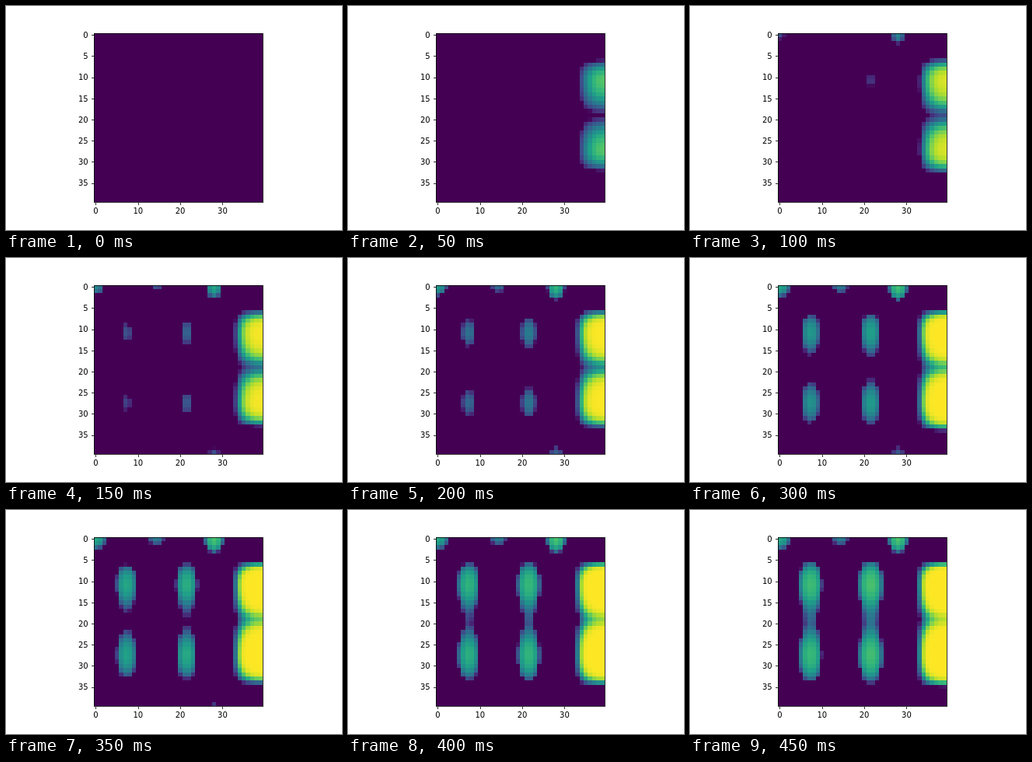
An HTML page with a canvas for the animation above (0.5 s loop, 432 px wide and 288 px high).

```html
<!DOCTYPE html>
<html lang="en">
<head>
<meta charset="utf-8">
<title>Growing spots heatmap</title>
<style>
  html, body { margin: 0; width: 100%; height: 100%; overflow: hidden; background: #fff; }
  canvas { display: block; }
</style>
</head>
<body>
<canvas id="stage" width="432" height="288"></canvas>
<script>
const ctx = document.getElementById("stage").getContext("2d");
const SIZE = 40, LEFT = 112.68, TOP = 34.56, CELL = 5.436;
const STEP = 50, LOOP = 500;
const PALETTE = [
  [68, 1, 84], [72, 40, 120], [62, 74, 137], [49, 104, 142], [38, 130, 142],
  [31, 158, 137], [53, 183, 121], [110, 206, 88], [181, 222, 43], [253, 231, 37]
];
const UPPER = 10.8, LOWER = 27.3, MIDDLE = 19.05;

const edgeX = i => Math.round(LEFT + i * CELL);
const edgeY = i => Math.round(TOP + i * CELL);
const rise = (t, start, tau) => 1 - Math.exp(-(t - start) / tau);

function colour(v) {
  const pos = Math.min(1, Math.max(0, v)) * (PALETTE.length - 1);
  const i = Math.min(PALETTE.length - 2, Math.floor(pos));
  const mix = PALETTE[i].map((c, k) => Math.round(c + (PALETTE[i + 1][k] - c) * (pos - i)));
  return `rgb(${mix})`;
}

// Cosine hump: 1 at the centre, 0 at the radius.
function hump(d, radius) {
  d = Math.abs(d);
  return d < radius ? (1 + Math.cos(Math.PI * d / radius)) / 2 : 0;
}

// Pair of large spots on the right edge.
function rightPair(x, y, t) {
  const inner = 9.2 + 0.002 * t;
  const upper = hump(y - 10.7, y < 10.7 ? 5.7 : inner);
  const lower = hump(y - LOWER, y > LOWER ? 6 + 0.006 * (t - 100) : inner);
  return 0.0165 * (t - 12) * hump(x - 39, 6.8) * (upper + lower) - 0.04;
}

// Two stacked spots that stretch towards each other until they join.
function column(x, y, t, cx, lead) {
  const isUpper = y < MIDDLE;
  const dx = x - cx, dy = y - (isUpper ? UPPER : LOWER);
  const height = 0.0015 * (t - 105) + lead - (isUpper ? 0 : 0.025);
  let drop;
  if (isUpper && dy < 0) drop = 0.0134 * dy ** 2 + 0.0001 * dy ** 4;
  else if (!isUpper && dy > 0) drop = 0.011 * dy ** 2;
  else drop = 0.198 * (1 - Math.cos(2 * Math.PI * dy / 16.5));
  return height - drop - 0.045 * dx ** 2 - 0.0026 * dx ** 4;
}

const spot = (x, y, cx, cy, height, kx, ky) =>
  height - kx * (x - cx) ** 2 - ky * (y - cy) ** 2;

function level(x, y, t) {
  if (t === 0) return 0;
  const field = Math.max(
    0,
    rightPair(x, y, t),
    column(x, y, t, 7.27, 0),
    column(x, y, t, 21.5, 0.04),
    spot(x, y, 0, 0, 0.38 * rise(t, 85, 80), 0.06, 0.06),
    spot(x, y, 14.3, 0, 0.18 * rise(t, 110, 80), 0.05, 0.08),
    spot(x, y, 28, 0, 0.57 * rise(t, 60, 90), 0.1, 0.048),
    spot(x, y, 28, 39, 0.1 - 5.5e-6 * (t - 235) ** 2, 0.05, 0.06)
  );
  return Math.sqrt(Math.tanh(field));
}

function drawMap(t) {
  for (let y = 0; y < SIZE; y++) {
    for (let x = 0; x < SIZE; x++) {
      ctx.fillStyle = colour(level(x, y, t));
      ctx.fillRect(edgeX(x), edgeY(y), edgeX(x + 1) - edgeX(x), edgeY(y + 1) - edgeY(y));
    }
  }
}

function drawAxes() {
  ctx.fillStyle = "rgba(0,0,0,0.8)";
  ctx.fillRect(113, 35, 218, 1);
  ctx.fillRect(113, 252, 218, 1);
  ctx.fillRect(113, 36, 1, 216);
  ctx.fillRect(330, 36, 1, 216);
  for (let n = 0; n < SIZE; n += 10) ctx.fillRect(edgeX(n + 0.5), 253, 1, 3);
  for (let n = 0; n < SIZE; n += 5) ctx.fillRect(110, edgeY(n + 0.5), 3, 1);

  ctx.fillStyle = "#000";
  ctx.font = '10px "DejaVu Sans", sans-serif';
  ctx.textBaseline = "alphabetic";
  ctx.textAlign = "center";
  for (let n = 0; n < SIZE; n += 10) ctx.fillText(n, LEFT + (n + 0.5) * CELL, 267);
  ctx.textAlign = "right";
  for (let n = 0; n < SIZE; n += 5) ctx.fillText(n, 105.7, Math.round(TOP + (n + 0.5) * CELL + 3.7));
}

let shown = -1;
function render(now) {
  const t = Math.floor((now % LOOP) / STEP) * STEP;
  if (t !== shown) {
    shown = t;
    ctx.fillStyle = "#fff";
    ctx.fillRect(0, 0, 432, 288);
    drawMap(t);
    drawAxes();
  }
}

const start = performance.now();
function tick() {
  render(performance.now() - start);
  requestAnimationFrame(tick);
}
tick();
</script>
</body>
</html>
```
